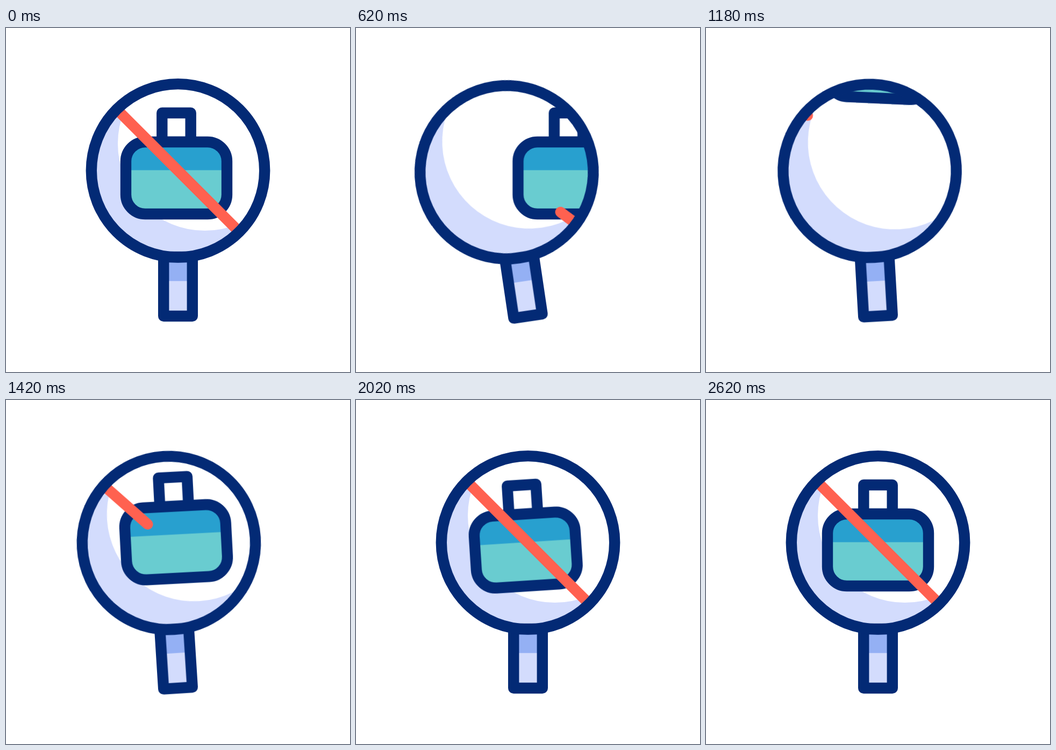
An HTML page that plays this animation: 640x640 px, repeating every 3.6 s.

```html
<!DOCTYPE html>
<html lang="en">
<head>
<meta charset="utf-8">
<title>No perfume sign</title>
<style>
  html, body { margin: 0; height: 100%; overflow: hidden; background: #fff; }
  svg { display: block; width: 100%; height: 100%; }

  .line { fill: none; stroke: #032a75; stroke-width: 20.4; stroke-linejoin: round; }
  .pale { fill: #d3dcfd; }
  .mid { fill: #94b0f4; }
  .white { fill: #fff; }
  .teal { fill: #69ccd0; }
  .blue { fill: #28a0cf; }
  .mask { fill: none; stroke: #fff; stroke-width: 500; }

  .sign, .move, .tilt, .slash {
    animation: 3600ms cubic-bezier(.333, 0, .667, 1) infinite;
  }
  .sign { animation-name: swing; transform-origin: 320px 536px; }
  .move { animation-name: move; }
  .tilt { animation-name: tilt; transform-origin: 320px 346px; }
  .slash {
    animation-name: draw;
    fill: none;
    stroke: #ff6150;
    stroke-width: 20;
    stroke-linecap: round;
    stroke-dasharray: 322.4 400;
  }

  @keyframes swing {
    0% { transform: rotate(0deg); animation-timing-function: cubic-bezier(.4, 0, .25, 1); }
    11.667% { transform: rotate(-14.1deg); animation-timing-function: cubic-bezier(.6, 0, .5, 1); }
    25.278% { transform: rotate(8.4deg); animation-timing-function: cubic-bezier(.55, 0, .5, 1); }
    36.389% { transform: rotate(-6.2deg); }
    45% { transform: rotate(2.62deg); }
    51.111% { transform: rotate(-1.2deg); }
    56.111%, 100% { transform: rotate(0deg); }
  }

  /* Slides out to the right, then drops in from above */
  @keyframes move {
    0% { transform: translate(-3px, 0); }
    7.222% { transform: translate(-30px, 0); animation-timing-function: cubic-bezier(.6, 0, .8, 1); }
    26.667% { transform: translate(320px, 0); animation-timing-function: step-end; }
    29.444% { transform: translate(0, -270px); }
    41.111%, 100% { transform: translate(0, 0); }
  }

  @keyframes tilt {
    0% { transform: rotate(0deg); animation-timing-function: step-end; }
    29.444% { transform: rotate(4.6deg); }
    39.444% { transform: rotate(-3deg); }
    48.333% { transform: rotate(4.2deg); }
    57.222% { transform: rotate(-4deg); }
    65.833% { transform: rotate(2.8deg); }
    72.778%, 100% { transform: rotate(0deg); }
  }

  @keyframes draw {
    0% { stroke-dashoffset: 0; }
    21.806% { stroke-dashoffset: -322.4; animation-timing-function: step-end; }
    30.972% { stroke-dashoffset: 322.4; }
    52.778%, 100% { stroke-dashoffset: 0; }
  }
</style>
</head>
<body>
<svg viewBox="0 0 640 640">
  <g class="sign">
    <circle class="pale" cx="320" cy="265.3" r="161"/>
    <circle class="white" cx="370" cy="215" r="162"/>
  </g>

  <g class="move">
    <g class="tilt">
      <path class="line" d="M293.3 212V158h53.4v54z"/>
      <rect class="teal" x="226" y="212" width="188" height="134" rx="36"/>
      <path class="blue" d="M226 264.5V248a36 36 0 0 1 36-36h116a36 36 0 0 1 36 36v16.5z"/>
      <rect class="line" x="226" y="212" width="188" height="134" rx="36"/>
    </g>
  </g>

  <g class="sign">
    <path class="slash" d="M206 151.3l228 228"/>
    <circle class="mask" cx="320" cy="265.3" r="411"/>
    <path class="pale" d="M293 426h54v110h-54z"/>
    <path class="mid" d="M293 426h54v44.7h-54z"/>
    <path class="line" d="M293.2 426h53.6v110h-53.6z"/>
    <circle class="line" cx="320" cy="265.3" r="161.2"/>
  </g>
</svg>
</body>
</html>
```
